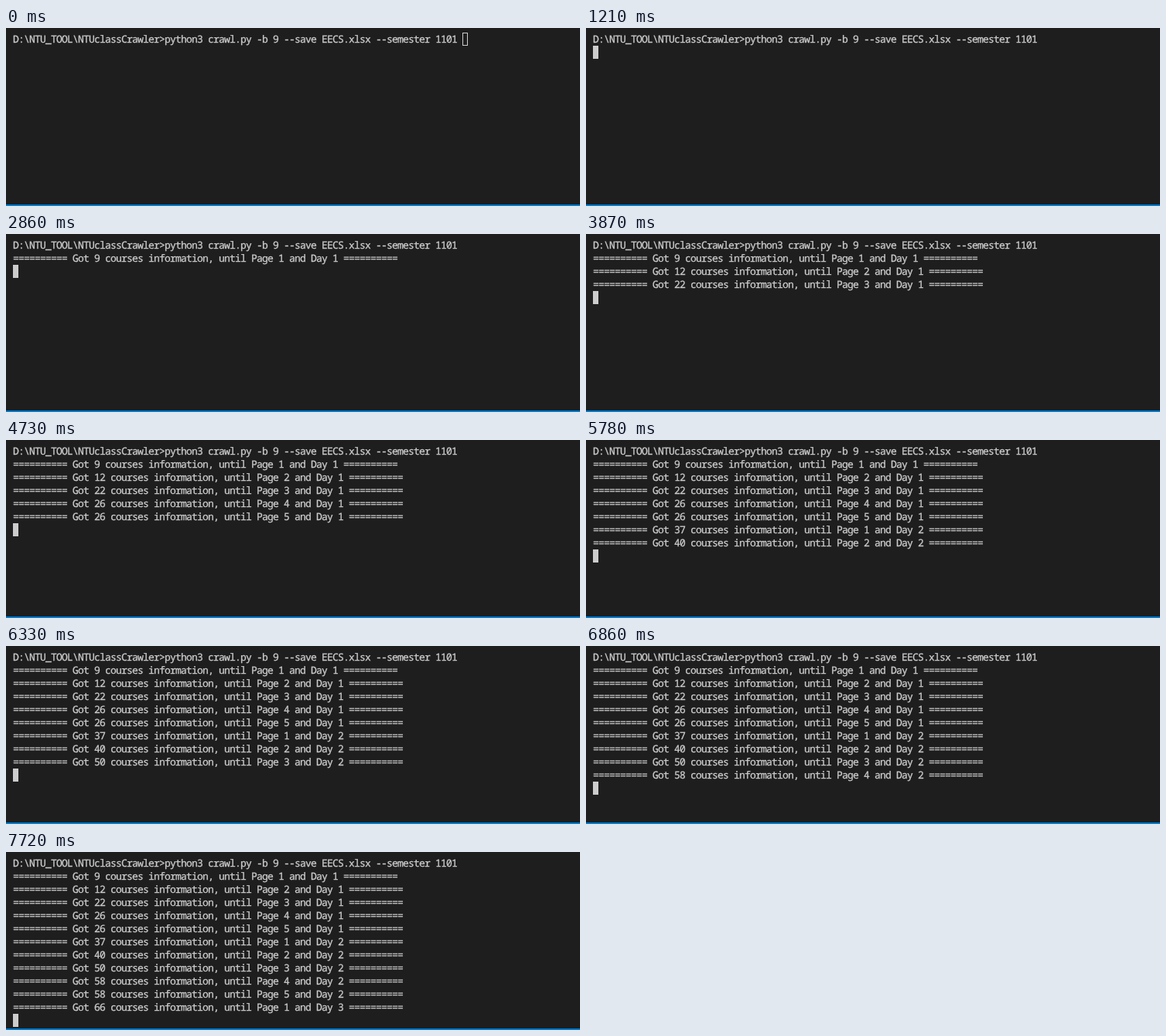
An HTML page for the animation above (8000 ms loop, 742 by 231 pixels).

```html
<!DOCTYPE html>
<html lang="en">
<head>
<meta charset="utf-8">
<title>Course crawler</title>
<style>
  html, body { margin: 0; width: 100%; height: 100%; overflow: hidden; background: #1e1e1e; }
  svg { display: block; }
  text {
    font: 13px "Noto Sans Mono", "DejaVu Sans Mono", monospace;
    fill: #ccc; stroke: #ccc; stroke-width: .3px;
    text-rendering: geometricPrecision;
  }
</style>
</head>
<body>
<svg width="742" height="231" viewBox="0 0 742 231">
  <rect width="742" height="231" fill="#1e1e1e"/>
  <rect y="229" width="742" height="2" fill="#007acc"/>
  <g id="lines"></g>
  <g id="cursor">
    <rect x=".5" y=".5" width="6" height="16" fill="none" stroke="#ccc"/>
    <rect id="block" width="7" height="17" fill="#ccc"/>
  </g>
</svg>
<script>
const LOOP = 8000, LEFT = 9, TOP = 6, CELL = 7, ROW = 17, BASELINE = 13;
const FOCUS = 1010, ENTER = 1210;
const command = "D:\\NTU_TOOL\\NTUclassCrawler>python3 crawl.py -b 9 --save EECS.xlsx --semester 1101";

// time in ms, courses found, page, day
const steps = [
  [2860, 9, 1, 1], [3340, 12, 2, 1], [3870, 22, 3, 1], [4400, 26, 4, 1],
  [4730, 26, 5, 1], [5320, 37, 1, 2], [5780, 40, 2, 2], [6330, 50, 3, 2],
  [6860, 58, 4, 2], [7190, 58, 5, 2], [7720, 66, 1, 3]
];

const byId = id => document.getElementById(id);

function addLine(content, row) {
  const line = document.createElementNS("http://www.w3.org/2000/svg", "text");
  line.setAttribute("x", LEFT);
  line.setAttribute("y", TOP + ROW * row + BASELINE);
  line.textContent = content;
  byId("lines").append(line);
  return line;
}

// Each entry is [time, style]; a style holds until the next entry.
function play(element, table) {
  const frames = table.map(([time, style]) => ({ ...style, offset: time / LOOP, easing: "step-end" }));
  frames.push({ ...table.at(-1)[1], offset: 1 });
  element.animate(frames, { duration: LOOP, iterations: Infinity });
}

const showAt = (element, time) => play(element, [[0, { opacity: 0 }], [time, { opacity: 1 }]]);
const cell = (column, row) => ({ transform: `translate(${LEFT + CELL * column}px, ${TOP + ROW * row}px)` });

// Fit the font's advance to the terminal's cell grid.
const prompt = addLine(command, 0);
const advance = prompt.getComputedTextLength() / command.length;
byId("lines").style.letterSpacing = `${CELL - advance}px`;

const bar = "=".repeat(10);
steps.forEach(([time, courses, page, day], i) => {
  const report = `${bar} Got ${courses} courses information, until Page ${page} and Day ${day} ${bar}`;
  showAt(addLine(report, i + 1), time);
});

showAt(byId("block"), FOCUS);
play(byId("cursor"), [
  [0, cell(command.length + 1, 0)],
  [ENTER, cell(0, 1)],
  ...steps.map(([time], i) => [time, cell(0, i + 2)])
]);
</script>
</body>
</html>
```
